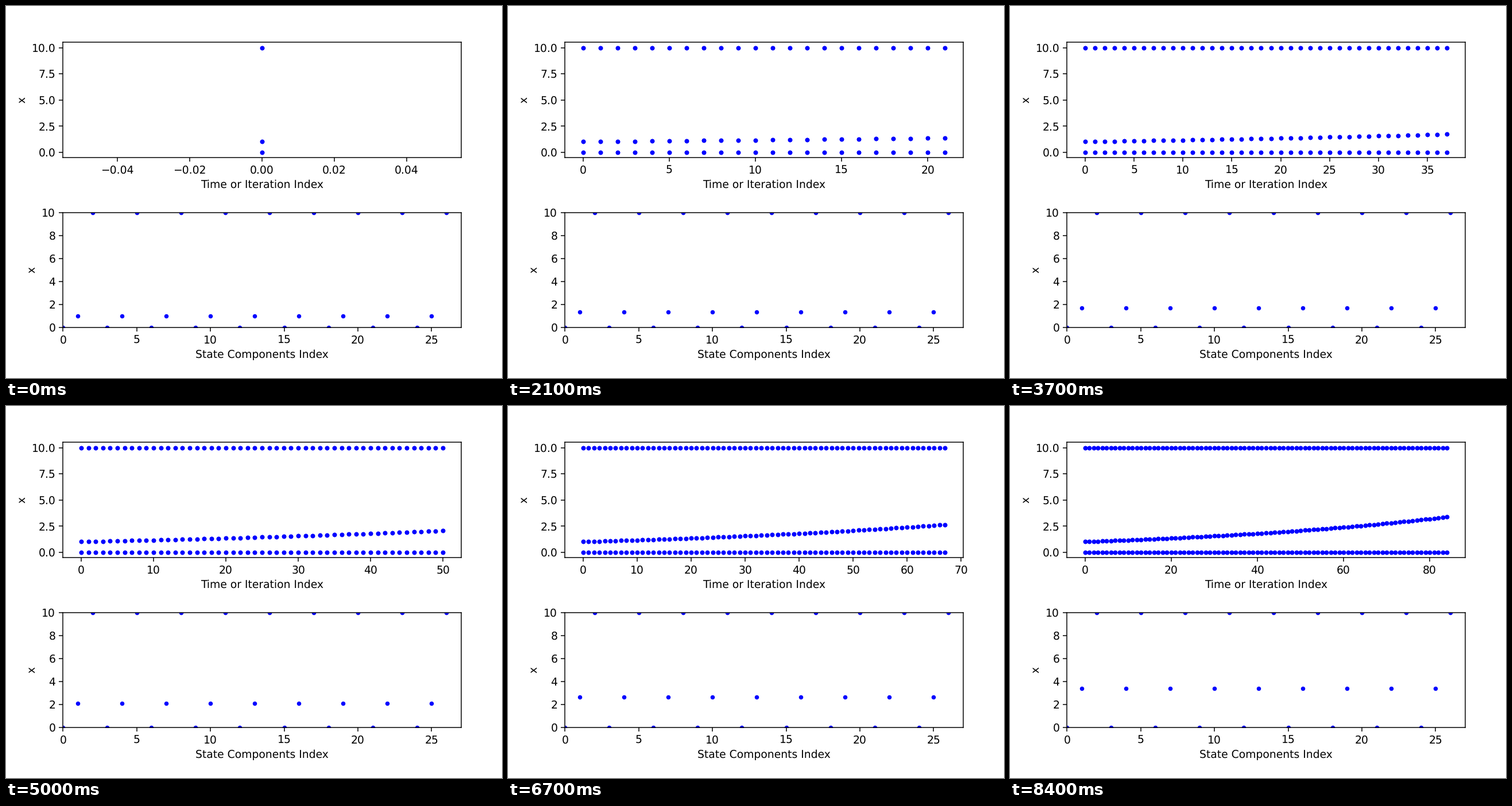
These frames come from a looping animation (864 by 648 pixels, 8500 ms). A matplotlib script:

```python
import numpy as np
import matplotlib.pyplot as plt
from matplotlib.animation import FuncAnimation

W, H, DPI = 864, 648, 135
STEPS, CELLS = 85, 9
OVERLAP = 3  # overlaid dots per value in the history panel
RATE = 0.0145


def values(t):
    """Two constants around one growing value at step t."""
    return [0.0, np.exp(RATE * t), 10.0]


def add_panel(bottom, xlabel):
    ax = fig.add_axes([99.4 / W, bottom / H, 693.2 / W, 200.25 / H])
    ax.set_xlabel(xlabel)
    ax.set_ylabel("x")
    return ax


plt.rcParams["font.family"] = "DejaVu Sans"
plt.rcParams["text.hinting"] = "none"
fig = plt.figure(figsize=(W / DPI, H / DPI), dpi=DPI, facecolor="white")

history = add_panel(384.3, "Time or Iteration Index")
profile = add_panel(88.2, "State Components Index")
profile.set_xlim(0, 3 * CELLS)
profile.set_ylim(0, 10)

trail, = history.plot([], [], "b.")
dots, = profile.plot(np.arange(3 * CELLS), np.tile(values(0), CELLS), "b.")


def update(i):
    rows = [np.tile(values(t), OVERLAP) for t in range(i + 1)]
    trail.set_data(np.repeat(np.arange(i + 1), 3 * OVERLAP),
                   np.concatenate(rows))
    history.relim()
    history.autoscale_view()
    dots.set_ydata(np.tile(values(i), CELLS))
    return trail, dots


def init():
    return update(0)


anim = FuncAnimation(fig, update, frames=STEPS, init_func=init,
                     interval=100, repeat=True, repeat_delay=0, blit=False)
plt.show()
```
